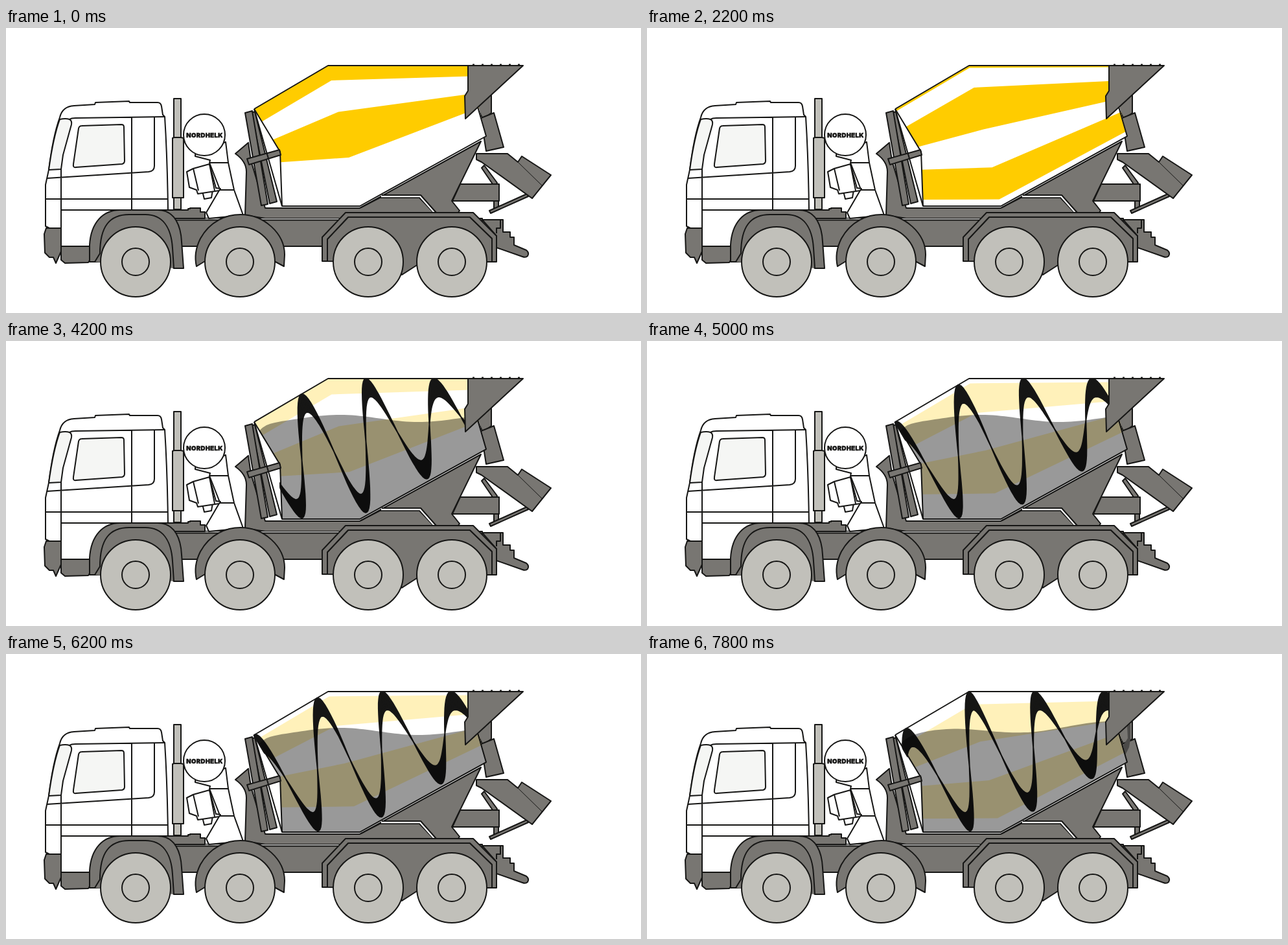
Recreate the animation shown at these times as an HTML page. Size 980 by 440 pixels, loop 8 s.

```html
<!DOCTYPE html>
<html lang="en">
<head>
<meta charset="utf-8">
<title>Truck mixer</title>
<style>
html, body { margin: 0; width: 100%; height: 100%; overflow: hidden; background: #fff; }
svg { display: block; width: 980px; height: 440px; }
.line { stroke: #161615; stroke-width: 2; stroke-linejoin: round; fill: none; }
.dark { fill: #787672; }
.light { fill: #c1c0ba; }
.white { fill: #fff; }
.glass { fill: #f5f6f4; }
text { font: 900 9.5px Inter, "DejaVu Sans", sans-serif; letter-spacing: .4px; fill: #161615; stroke: #161615; stroke-width: .5; }
</style>
</head>
<body>
<svg viewBox="0 0 980 440">
  <defs>
    <clipPath id="shell"><path d="M383 125L497 58H713L741 167L546 275H426L423 191Z"/></clipPath>
    <clipPath id="room"><path d="M380 123L497 55H714V130L709 140L728 176L548 278H424L421 192Z"/></clipPath>
  </defs>

  <!-- chassis and drum support -->
  <g class="line dark">
    <path d="M250 294H735V337H250Z"/>
    <path d="M354 194L374 177L378 205L400 278H546L733 175L688 267L700 282L694 290H524L516 294H400L369 289L371 222Q371 206 354 194Z"/>
    <path d="M701 241H761V267H689Z"/>
    <path d="M753 267H760V279L753 282Z"/>
    <path d="M738 212L758 239L757 241H751L734 216Z"/>
    <path d="M746 282L804 256L806 260L748 286Z"/>
    <path d="M726 194H774L790 207L796 198L841 227L812 263L734 207L726 203Z"/>
    <path d="M789 206L827 243" stroke-width="1"/>
    <path d="M735 296H767V315H778V323H784V335L803 343Q808 347 805 352Q802 355 797 353L757 339V321Z"/>
    <path d="M757 317V309H763V296"/>
  </g>
  <path d="M260 295H520" stroke="#fff" stroke-width="1.6"/>
  <path class="line" d="M260 296.500H518M548 277L577 262H638L660 285" stroke-width="1.6"/>
  <path d="M579 260H639L662 286" fill="none" stroke="#fff" stroke-width="2.4"/>
  <path class="line" d="M580 258H640L664 285"/>

  <!-- neck behind the hopper -->
  <g class="line dark">
    <path d="M727 122L749 102V131L736 141Z"/>
    <path d="M733 139L753 131L768 184L741 190Z"/>
  </g>
  <path id="flow" d="M741 110L746 108V132L744 144L738 156L735 141L742 130Z" fill="#4b4a48"/>

  <!-- drum -->
  <path class="white" d="M383 125L497 58H713L741 167L546 275H426L423 191Z"/>
  <path id="stripes" fill="#fc0" clip-path="url(#shell)"/>
  <path class="line" d="M383 125L497 58H713M728 122L741 167L546 275H426L423 191L383 125"/>
  <g id="inside">
    <g clip-path="url(#room)"><path id="spiral" fill="#161615" stroke="#161615" stroke-width="2" stroke-linejoin="round"/></g>
    <path id="concrete" fill-opacity=".4" clip-path="url(#shell)"/>
  </g>
  <g class="line dark">
    <path d="M713 58H798L709 140L708 105L713 97Z"/>
    <path d="M720 57H793" stroke-width="3" stroke-dasharray="3 11"/>
    <path d="M379 131L384 129L418 268L407 271Z"/>
    <path d="M369 131L380 128L404 272L394 274Z"/>
    <path d="M372 202L422 188L424 196L375 211Z"/>
    <path d="M383 125L426 275" fill="none"/>
  </g>

  <!-- tank and pump -->
  <g class="line white">
    <path d="M339 176L343 208L352 250L366 289L313 294L309 285L330 249L314 208L315 204L292 198V195L300 190Z"/>
    <path d="M314 208H343M325 250H352"/>
    <path d="M303 252L306 264L317 262L319 250"/>
    <path d="M289 217L314 210L324 247L331 248L329 251L296 256L294 250L283 246L279 222Z"/>
    <path d="M289 217L297 251M314 210L322 251"/>
    <circle cx="306" cy="165" r="32"/>
  </g>
  <text x="306.500" y="168.500" text-anchor="middle">NORDHELK</text>

  <!-- cab -->
  <g class="line light">
    <path d="M259 109H270V280H259Z"/>
    <path d="M259 169H270L274 170V262H257V170Z"/>
  </g>
  <path class="line dark" d="M235 281H281V279H284V278H300V284H307V294H250Z"/>
  <g class="line white">
    <path d="M85 337V281M85 337H130L150 290L250 281Q249 200 245 137L242 134L240 121Q239 115 234 115H191L190 113L138 115L137 118L105 120Q87 121 83 138C75 160 69 195 66 219L61 242V306L67 309H85V337Z"/>
    <path class="glass" d="M83 141Q92 139 98 141Q102 143 101 149L88 196L85 218L66 219C70 190 76 160 83 141Z"/>
    <path class="glass" d="M117 151L178 149Q182 149 182 153L183 205Q183 209 179 210L108 215Q103 216 104 210L112 155Q113 151 117 151Z"/>
    <path fill="none" d="M85 218V337M98 141Q101 139 107 139L245 137M194 138V280M63 232L220 222Q229 221 229 213V138M61 264H250M85 281H250"/>
  </g>
  <g class="line dark">
    <path d="M62 309H85V345L81 354L77 363L73 354H67L60 347L59 318Z"/>
    <path d="M85 337H130V357L127 362L91 363L85 358Z"/>
    <path d="M129 361V335C131 300 150 281 176 281H234C262 281 270 308 271 330L274 371H259L250 361H137Z"/>
    <path d="M259 371L257 340C255 308 242 288 215 288H190C160 288 145 306 145 348L137 361"/>
    <path d="M294 368Q289 347 300 325C315 298 340 288 362 288C398 288 430 317 430 350L429 368L414 360H307Z"/>
    <path d="M496 360V326L528 292H716L750 325V361H642L611 381L604 361Z"/>
    <path d="M488 360V323L524 285H721L757 321V361H750V325L716 292H528L496 326V360Z"/>
  </g>
  <g id="wheels" class="line light"></g>
</svg>
<script>
const LOOP = 8000, STEP = 200, TAU = 2 * Math.PI;
const get = id => document.getElementById(id);
const set = (id, name, value) => get(id).setAttribute(name, value);
const mix = (a, b, k) => a + (b - a) * k;
const ramp = (time, from, to) => Math.max(0, Math.min(1, (time - from) / (to - from)));
const range = (count, make) => Array.from({ length: count }, (_, i) => make(i));
const join = points => points.map(p => p.map(v => v.toFixed(1)).join(' ')).join('L');
const polygon = points => `M${join(points)}Z`;

get('wheels').innerHTML = [200, 361, 559, 688].map(x =>
  [54, 21].map(r => `<circle cx="${x}" cy="361" r="${r}"/>`).join('')).join('');

// time and turns of the drum: it mixes one way, then empties the other way
const TURNS = [[0, 0], [1200, -.72], [3000, -2], [4200, -2.985], [5000, -3.74], [6200, -4.74], [7000, -5.4], [7800, -4.57]];

function drumPhase(time) {
  const next = Math.max(1, TURNS.findIndex(([at]) => at >= time));
  const [[t0, a], [t1, b]] = [TURNS[next - 1], TURNS[next]];
  const turns = mix(a, b, ramp(time, t0, t1));
  return turns - Math.floor(turns);
}

// a line along the drum at one angle around its axis
function stripeEdge(degrees) {
  const angle = Math.max(0, Math.min(180, degrees)) * Math.PI / 180;
  const depth = (1 - Math.cos(angle)) / 2;
  const swell = 8 * Math.sin(TAU * depth);
  const y = 125 + 150 * depth + swell - 6 + 6 * Math.cos(TAU * depth);
  const x = y < 191 ? mix(383, 423, (y - 125) / 66) : mix(423, 426, (y - 191) / 84);
  return [[x, y], [497 + 49 * depth, 58 + 217 * depth], [713 + 28 * depth, 58 + 109 * depth + swell]];
}

const stripes = phase => range(4, i => {
  const start = 82 * phase + 70 * (i - 2);
  return polygon([...stripeEdge(start), ...stripeEdge(start + 38).reverse()]);
}).join('');

// a point of the blade, a given width in from the drum wall
function bladePoint(turn, phase, width) {
  const n = turn + phase;
  const t = 454 + 97.5 * n + 2.5 * n * n;
  const lean = 52 - ((t - 480) / 43) ** 2;
  const top = Math.max(58, 125 - (t - 383) * .588);
  const foot = 273 - Math.max(0, t + lean - 541) * .554;
  const reach = 1 - 2 * width / (foot - top);
  const depth = (1 - reach * Math.cos(turn * TAU)) / 2;
  return [t + lean * depth, mix(top, foot, depth)];
}

function spiral(phase) {
  const edge = width => range(161, i => bladePoint(mix(-.8, 2.6, i / 160) - phase, phase, width));
  const outer = edge(0), inner = edge(28);
  return range(160, i => polygon([outer[i], outer[i + 1], inner[i + 1], inner[i]])).join('');
}

// the concrete's surface; emptying tips it towards the mouth
function surface(tip) {
  const crest = 515 - 52 * tip;
  const level = x => 119.5 - tip * (3.5 + .048 * (x - 575))
    - 5.5 * Math.cos((x - crest) / 122 * Math.PI) + 20 * Math.exp((386 - x) / 12);
  const points = range(61, i => [384 + 6 * i, level(384 + 6 * i)]);
  return polygon([...points, [744, 280], [384, 280]]);
}

function draw(time) {
  const open = ramp(time, 2400, 3000);
  const phase = drumPhase(time);
  set('stripes', 'd', stripes(phase));
  set('stripes', 'opacity', mix(1, .27, open));
  set('inside', 'opacity', open);
  set('spiral', 'd', spiral(phase));
  set('concrete', 'd', surface(ramp(time, 7000, 7600)));
  set('flow', 'opacity', ramp(time, 7200, 7800));
}

const begin = performance.now();
let shown = -1;
function tick() {
  const time = Math.floor((performance.now() - begin) % LOOP / STEP) * STEP;
  if (time !== shown) draw(shown = time);
  requestAnimationFrame(tick);
}
tick();
</script>
</body>
</html>
```
